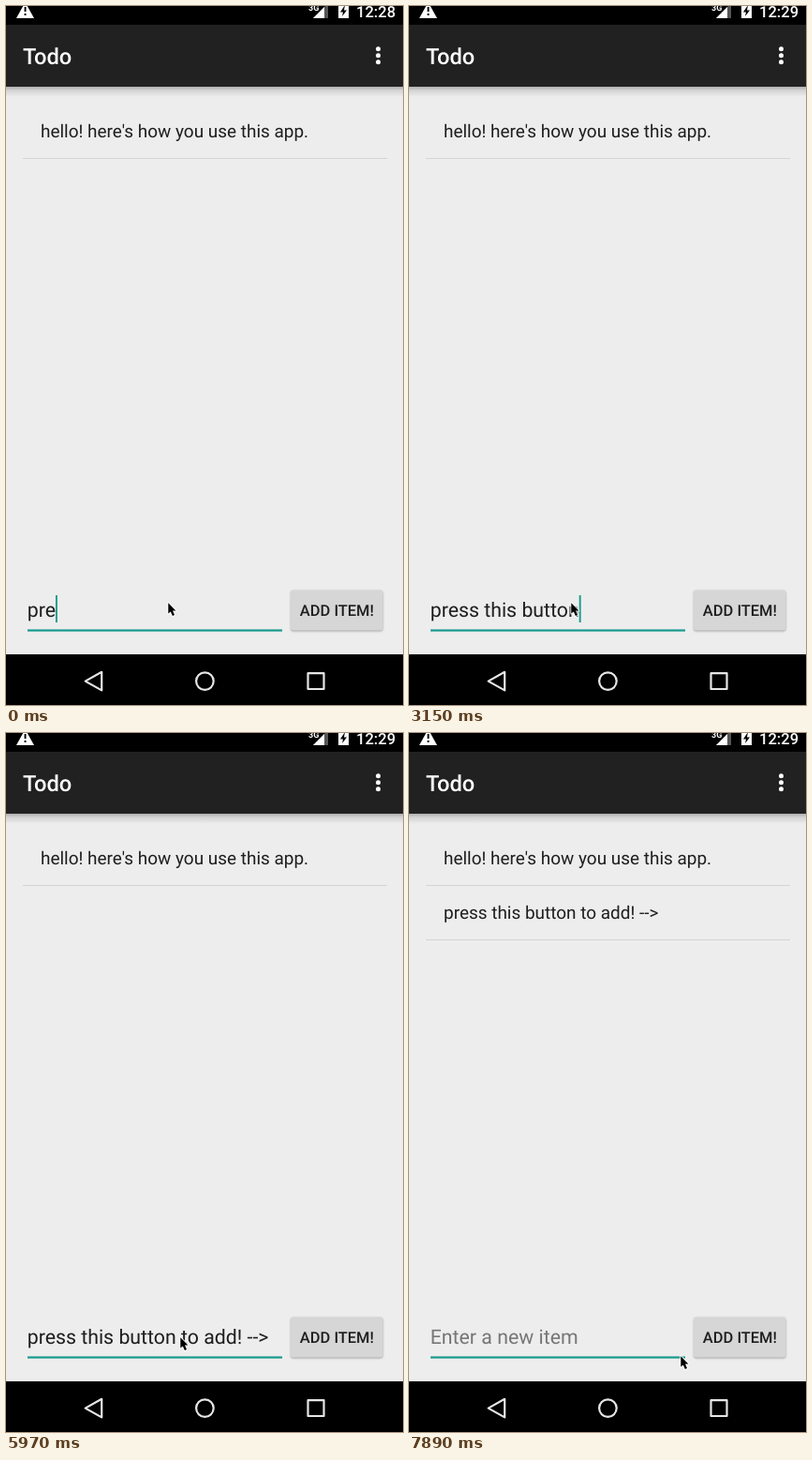
Write an HTML page with a canvas that moves like this. It is 424 px wide and 745 px high and loops after 8 s.

```html
<!DOCTYPE html>
<html lang="en">
<head>
<meta charset="utf-8">
<title>Todo</title>
<style>
  html, body { margin: 0; width: 100%; height: 100%; overflow: hidden; background: #ededed; }
  canvas { display: block; width: 424px; height: 745px; }
</style>
</head>
<body>
<canvas id="stage"></canvas>
<script>
const W = 424, H = 745, LOOP = 8000;
const FRAME = 148.8, BLINK = 445, ADDED = 7310;
const TEAL = '#179a8d', INK = '#1e1e1e';
const FIRST = "hello! here's how you use this app.";
const SECOND = 'press this button to add! -->';
const FIELD_X = 22.7, FIELD_SIZE = 21.3;

const canvas = document.getElementById('stage');
const ctx = canvas.getContext('2d');
const dpr = window.devicePixelRatio || 1;
canvas.width = W * dpr;
canvas.height = H * dpr;

// Bursts of even typing; a slip adds one wrong letter, fixed by the next burst
const bursts = [
  { at: 0, gap: 150, from: 3, to: 12, steps: 7 },
  { at: 1200, from: 13 },
  { at: 1950, from: 14, slip: 'o' },
  { at: 2850, gap: 148.5, from: 14, to: 24, steps: 7 },
  { at: 4190, gap: 445, from: 25, to: 29, steps: 3 },
  { at: ADDED, from: 0 }
];

const clamp = v => Math.min(1, Math.max(0, v));
const ramp = (t, start, end) => clamp((t - start) / (end - start));
const smooth = p => p * p * (3 - 2 * p);
const mix = (a, b, p) => a + (b - a) * p;

function typed(t) {
  const { at, gap = 1, from, to = from, steps = 0, slip = '' } = bursts.findLast(b => b.at <= t);
  const step = Math.min(steps, Math.floor((t - at) / gap));
  const count = steps ? Math.round(mix(from, to, step / steps)) : from;
  return { value: SECOND.slice(0, count) + slip, since: at + step * gap };
}

function pointerAt(t) {
  const go = smooth(ramp(t, 5850, 6500));
  const leave = ramp(t, 7330, 7880);
  return [
    mix(mix(173, 374.5, go), 290, leave),
    mix(mix(636, 639, go) + 36 * Math.sin(Math.PI * go), 664, leave)
  ];
}

function rect(x, y, w, h, color) {
  ctx.fillStyle = color;
  ctx.fillRect(x, y, w, h);
}

function text(str, x, y, size, color = INK, weight = 400) {
  ctx.font = `${weight} ${size}px Roboto, sans-serif`;
  ctx.fillStyle = color;
  ctx.fillText(str, x, y);
  return ctx.measureText(str).width;
}

function path(points) {
  ctx.beginPath();
  points.forEach(([x, y]) => ctx.lineTo(x, y));
  ctx.closePath();
}

function shape(points, color) {
  path(points);
  ctx.fillStyle = color;
  ctx.fill();
}

function disc(x, y, r) {
  ctx.beginPath();
  ctx.arc(x, y, r, 0, Math.PI * 2);
}

function drawStatusBar(t) {
  rect(0, 0, W, 20, '#000');
  shape([[20.5, -4], [30, 13], [11, 13]], '#fff');
  rect(19.6, 1, 1.9, 5, '#000');
  rect(19.6, 8, 1.9, 2, '#000');
  shape([[344, -3], [344, 13], [328, 13]], '#555');
  shape([[340, 1], [340, 13], [328, 13]], '#fff');
  text('3G', 323, 5, 9, '#fff', 700);
  rect(355, -2, 11, 15, '#fff');
  shape([[362, -1], [357, 6.5], [360, 6.5], [359, 11], [364, 4.5], [361, 4.5]], '#000');
  text(t < 600 ? '12:28' : '12:29', 374, 11.5, 16.57, '#fff', 500);
}

function drawToolbar() {
  const fade = ctx.createLinearGradient(0, 86, 0, 97);
  fade.addColorStop(0, 'rgba(0,0,0,.27)');
  fade.addColorStop(.35, 'rgba(0,0,0,.11)');
  fade.addColorStop(1, 'rgba(0,0,0,0)');
  rect(0, 86, W, 11, fade);
  rect(0, 20, W, 66, '#212121');
  text('Todo', 18, 62, 23.67, '#fff', 500);
  ctx.fillStyle = '#fff';
  for (let i = -1; i <= 1; i++) {
    disc(397.5, 52.8 + 7 * i, 2.5);
    ctx.fill();
  }
}

function drawRow(str, baseline) {
  text(str, 37, baseline, 18.97);
  rect(18, Math.round(baseline + 21.5), 389, 1, '#d4d4d4');
}

function drawField(t) {
  const { value, since } = typed(t);
  const width = text(value, FIELD_X, 651, FIELD_SIZE);
  if (!value) text('Enter a new item', FIELD_X, 651, FIELD_SIZE, '#767676');
  rect(23, 664.4, 272, 2.2, TEAL);
  if (Math.floor((t - since) / BLINK) % 2 === 0) rect(FIELD_X + width, 628, 1.9, 29, TEAL);
}

function drawButton(t) {
  const press = ramp(t, 7080, 7280) * (1 - ramp(t, 7400, 7740));
  const gray = mix(213.5, 184, press);
  ctx.save();
  ctx.shadowColor = 'rgba(0,0,0,.3)';
  ctx.shadowBlur = mix(2, 5, press) * dpr;
  ctx.shadowOffsetY = mix(1, 2, press) * dpr;
  ctx.beginPath();
  ctx.roundRect(304, 622.5, 98.5, 43, 2.4);
  ctx.fillStyle = `rgb(${gray}, ${gray}, ${gray})`;
  ctx.fill();
  ctx.restore();
  text('ADD ITEM!', 313.8, 650, 16.48, INK, 500);
}

function drawNavBar() {
  rect(0, 691, W, 54, '#000');
  ctx.strokeStyle = '#e6e6e6';
  ctx.lineWidth = 2.2;
  ctx.lineJoin = 'round';
  path([[84.7, 719.6], [102.2, 709.8], [102.2, 729.4]]);
  ctx.stroke();
  disc(212.4, 719.6, 9.3);
  ctx.stroke();
  ctx.strokeRect(322.5, 711.2, 17, 16.8);
}

function drawPointer(t) {
  ctx.save();
  ctx.translate(...pointerAt(t).map(Math.round));
  path([[.3, .3], [.3, 11.6], [2.8, 9.4], [4.9, 14], [7, 13], [5, 8.6], [8.4, 8.4]]);
  ctx.strokeStyle = 'rgba(255,255,255,.85)';
  ctx.lineWidth = 2;
  ctx.stroke();
  ctx.fillStyle = '#000';
  ctx.fill();
  ctx.restore();
}

function draw(t) {
  const held = Math.floor(t / FRAME) * FRAME;
  ctx.setTransform(dpr, 0, 0, dpr, 0, 0);
  ctx.textRendering = 'geometricPrecision';
  rect(0, 0, W, H, '#ededed');
  drawToolbar();
  drawStatusBar(t);
  drawRow(FIRST, 140);
  if (t >= ADDED) drawRow(SECOND, 198);
  drawField(t);
  drawButton(held);
  drawNavBar();
  drawPointer(held);
}

const begin = performance.now();
function tick() {
  draw((performance.now() - begin) % LOOP);
  requestAnimationFrame(tick);
}
tick();
</script>
</body>
</html>
```
